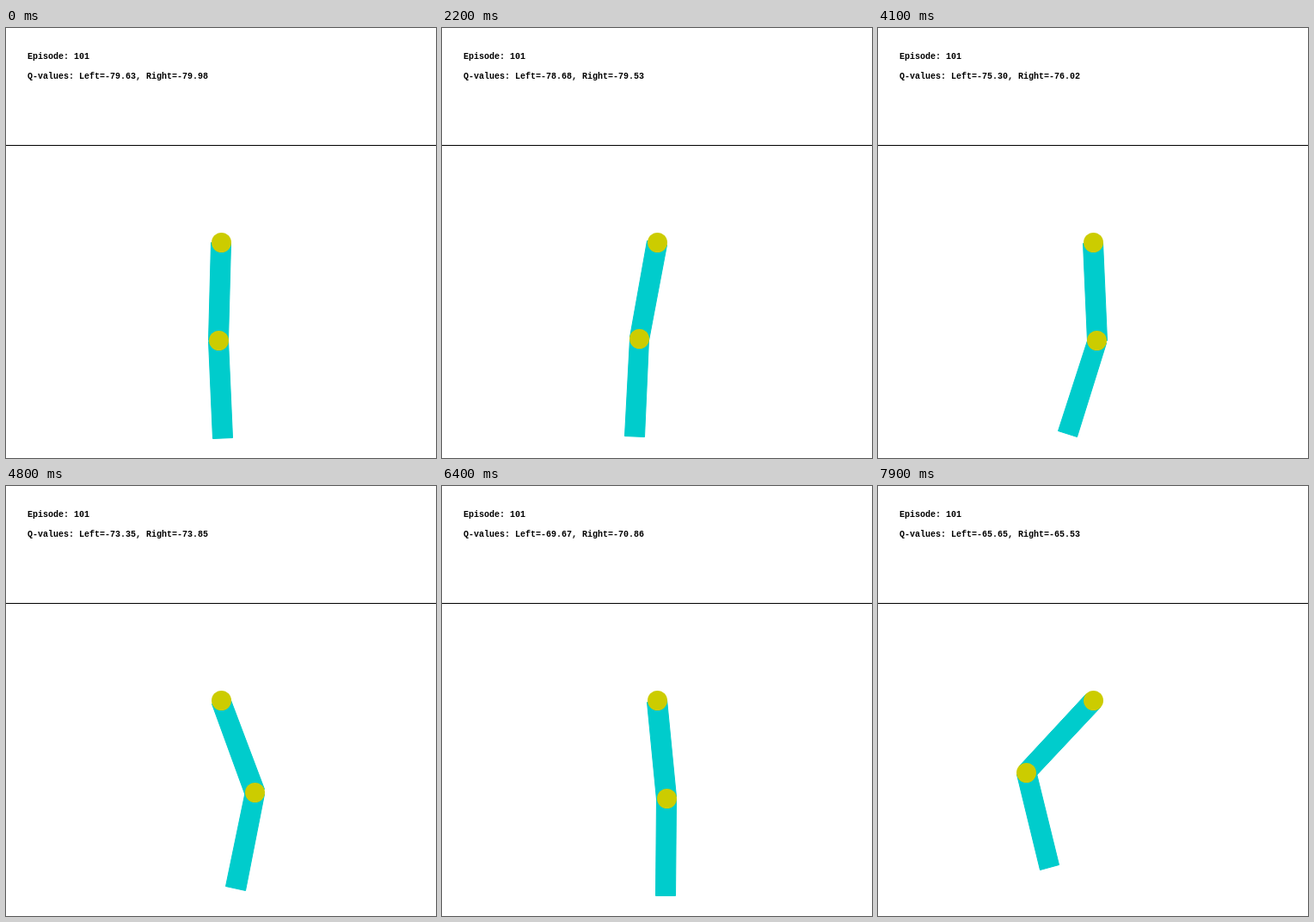
An HTML page with a canvas that plays this animation: 500x500 px, repeating every 8000 ms.

```html
<!DOCTYPE html>
<html>
<head>
<meta charset="utf-8">
<title>Acrobot</title>
<style>
html, body { margin: 0; height: 100%; overflow: hidden; background: #fff; }
canvas { display: block; }
</style>
</head>
<body>
<canvas id="stage" width="500" height="500"></canvas>
<script>
const ctx = document.getElementById('stage').getContext('2d');
const STEP = 100, STEPS = 80;
const SCALE = 500 / 4.4, HALF = SCALE / 10, MID = 250;

// Turning points [step, value] of the two swing modes of the double pendulum.
const fast = [[0, -.03], [5.5, .225], [11.1, -.034], [16.6, .245], [22.1, -.14],
  [27.5, .34], [33.2, -.16], [38.7, .343], [43.9, -.244], [49.2, .416],
  [55.4, -.425], [61.1, .634], [67.4, -.62], [73.4, .82], [79, -.673]];
const slow = [[0, .0046], [8.3, -.06], [16.7, .005], [25, -.06], [33.4, 0],
  [41.7, -.06], [50, .03], [58, -.02], [67, .026], [79, -.076]];

// [step, left, right]
const qValues = [[0, -79.63, -79.98], [5, -80.4, -80.75], [11, -79.99, -80.76],
  [34, -77.25, -78.18], [48, -73.35, -73.85], [58, -70.75, -72.12],
  [63, -70.2, -71.3], [70, -66.5, -68.23], [79, -65.65, -65.53]];

const linear = u => u;
const swing = u => (1 - Math.cos(Math.PI * u)) / 2;

function sample(keys, n, ease, col = 1) {
  const i = Math.max(1, keys.findIndex(k => k[0] >= n));
  const a = keys[i - 1], b = keys[i];
  return a[col] + (b[col] - a[col]) * ease((n - a[0]) / (b[0] - a[0]));
}

// World coordinates point up and snap to whole pixels.
const pixel = (x, y) => [Math.floor(x) + .5, 499.5 - Math.floor(y)];

function link(x, y, angle) {
  const s = Math.sin(angle), c = Math.cos(angle);
  const corner = (along, side) =>
    pixel(x + s * along + c * side, y - c * along + s * side);
  ctx.fillStyle = ctx.strokeStyle = '#00cccc';
  ctx.beginPath();
  ctx.moveTo(...corner(0, HALF));
  ctx.lineTo(...corner(0, -HALF));
  ctx.lineTo(...corner(SCALE, -HALF));
  ctx.lineTo(...corner(SCALE, HALF));
  ctx.closePath();
  ctx.fill();
  ctx.stroke();

  ctx.fillStyle = '#cccc00';
  ctx.beginPath();
  ctx.arc(...pixel(x, y), 11.5, 0, 2 * Math.PI);
  ctx.fill();
  return [x + s * SCALE, y - c * SCALE];
}

function draw(n) {
  ctx.fillStyle = '#fff';
  ctx.fillRect(0, 0, 500, 500);
  ctx.fillStyle = '#000';
  ctx.fillRect(0, 136, 500, 1);

  ctx.font = 'bold 10px "Liberation Mono", monospace';
  const left = sample(qValues, n, linear, 1).toFixed(2);
  const right = sample(qValues, n, linear, 2).toFixed(2);
  ctx.fillText('Episode: 101', 25, 36);
  ctx.fillText(`Q-values: Left=${left}, Right=${right}`, 25, 59);

  const f = sample(fast, n, swing), s = sample(slow, n, swing);
  const [x, y] = link(MID, MID, f + s);
  link(x, y, -.79 * f + 3.8 * s);
}

function tick() {
  draw(Math.floor(performance.now() / STEP) % STEPS);
  requestAnimationFrame(tick);
}
tick();
</script>
</body>
</html>
```
